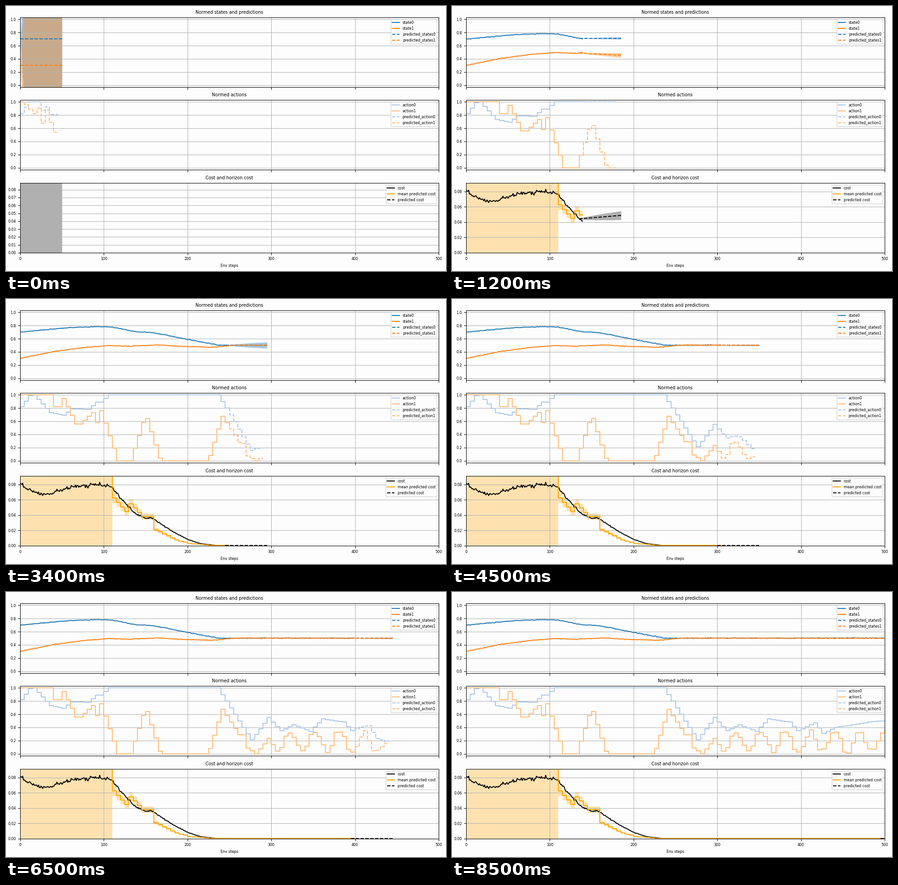
Recreate the animation shown at these times as a matplotlib script. Size 964 by 581 pixels, loop 8.6 s.

```python
import numpy as np
import matplotlib.pyplot as plt
from matplotlib.animation import FuncAnimation
from matplotlib.ticker import MultipleLocator

W, H, DPI = 964, 581, 96
FRAMES, INTERVAL = 86, 100
BLOCK, HORIZON, LEARNED, SETTLED = 5, 50, 110, 240
PAPER = "#fdfdfd"
STATE_COLORS = ("#1f77b4", "#ff7f0e")
ACTION_COLORS = ("#aec7e8", "#ffbb78")

plt.rcParams.update({"font.family": "DejaVu Sans", "font.size": 6,
                     "axes.facecolor": PAPER})
rng = np.random.RandomState(4)
steps = np.arange(561)
blocks = np.arange(0, 561, BLOCK)
ramp = np.linspace(0, 1, HORIZON + 1)


def curve(points, smooth):
    """Smoothed line through a few (x, y) points, one value per step."""
    y = np.pad(np.interp(steps, *zip(*points)), smooth // 2, mode="edge")
    return np.convolve(y, np.ones(smooth) / smooth, mode="valid")


def fade(s, start, span):
    return np.exp(-max(s - start, 0) / span)


# Smooth trends and their noisy observations
trend = [
    curve([(0, .70), (55, .765), (90, .784), (110, .777), (137, .708), (160, .69),
           (200, .59), (237, .501), (500, .504)], 9),
    curve([(0, .30), (40, .405), (75, .465), (105, .495), (130, .487), (167, .505),
           (185, .488), (232, .47), (255, .503), (500, .50)], 9),
]
states = [t + rng.normal(0, .0028, t.size) for t in trend]

cost_trend = curve([(0, .083), (5, .075), (28, .067), (35, .068), (60, .0765),
                    (90, .080), (108, .078), (136, .043), (148, .037), (158, .036),
                    (180, .020), (200, .0083), (216, .0026), (235, .0004), (500, .0002)], 5)
cost = cost_trend * (1 + rng.normal(0, .015, steps.size))

# Actions hold one value per block; once settled they wander around a set point
act0 = np.interp(blocks, *zip(
    (0, .82), (10, .99), (15, 1), (35, .73), (50, .69), (60, .79), (80, .78), (90, .89),
    (95, .89), (105, 1), (235, 1), (270, .3), (275, .21), (295, .55), (310, .35),
    (325, .44), (345, .34), (360, .53), (385, .48), (395, .35), (415, .47), (425, .31),
    (440, .40), (490, .50)))
act1 = np.interp(blocks, *zip(
    (35, 1), (40, .82), (45, .82), (50, .95), (65, .56), (70, .56), (85, .73), (90, .58),
    (95, .76), (115, 0), (130, 0), (145, .58), (150, .64), (165, .04), (170, 0), (220, 0),
    (225, .08), (240, .68), (260, .29), (265, .29), (270, .09), (280, 0), (295, .23)))
wave = .19 - .15 * np.cos(2 * np.pi * (blocks - 335) / 29.5)
wave += rng.normal(0, .03, wave.size)
act1 = np.where(blocks < 300, act1, wave).clip(0, 1)
actions = [act0, act1]

# Cost expected by the model: useless before LEARNED, then one value per block
mean_cost = np.interp(steps // BLOCK * BLOCK, *zip(
    (110, .0625), (125, .045), (130, .055), (145, .038), (155, .038), (160, .021),
    (185, .0075), (200, .003), (230, .0004)))
mean_cost[:LEARNED] = .5
mean_std = np.where(steps < LEARNED, .6, .11 * mean_cost)


def start_step(k):
    """Environment step at which the plan of this frame begins."""
    if k < 6:
        return BLOCK * int(round(21 * (1 - (1 - k / 6) ** 1.5)))
    return 75 + BLOCK * (k - (k > 64))


def plan(s, i):
    """Coming actions: jittery at first, easing off once settled."""
    b = s // BLOCK + (s > 0)
    p = actions[i][b:b + 8 + (s == 0)].copy()
    r = np.linspace(0, 1, p.size)
    if s > SETTLED:
        p *= 1 - .5 * r ** 2
    elif s < LEARNED:
        noise = np.random.RandomState(s + i).normal(0, .06, p.size)
        p += (1 - s / LEARNED) * ((.1, -.3)[i] * r + noise * (r > .15))
    return np.append(p, p[-1]).clip(0, 1)


def predict_state(s, i):
    drift = -.035 * i * min(s / 135, 1)
    hold = fade(s, 135, 24)
    mean = (1 - hold) * trend[i][s:s + HORIZON + 1] + hold * (trend[i][s] + drift * ramp)
    if s < LEARNED:
        return mean, .8 * np.minimum(ramp * 12, 1)
    bump = .036 * np.exp(-((s - 245) / 15) ** 2) * (1 - i)
    return mean, (.011 + (.006 + .016 * i) * fade(s, 135, 40) + bump) * ramp ** .7


def predict_cost(s):
    if s < LEARNED:
        return .5 + 0 * ramp, .8 + 0 * ramp
    hold = fade(s, 135, 16)
    mean = (1 - hold) * cost_trend[s:s + HORIZON + 1] + hold * (cost_trend[s] + .0045 * ramp)
    return mean, (.0038 * hold + .002 * fade(s, 180, 15)) * ramp ** .6


fig = plt.figure(figsize=(W / DPI, H / DPI), dpi=DPI, facecolor=PAPER)


def panel(top, title, labels=False):
    ax = fig.add_axes([31 / W, 1 - (top + 153) / H, 917 / W, 153 / H])
    ax.set_title(title)
    ax.set_xlim(0, 500)
    ax.set_ylim(-.03, 1.03)
    ax.xaxis.set_major_locator(MultipleLocator(100))
    ax.yaxis.set_major_locator(MultipleLocator(.2))
    ax.tick_params(labelbottom=labels)
    ax.grid(True)
    return ax


def line(ax, label, color, **kw):
    return ax.plot([], [], label=label, color=color, **kw)[0]


def pair(ax, label, colors, **kw):
    return [line(ax, f"{label}{i}", c, **kw) for i, c in enumerate(colors)]


ax_s = panel(25, "Normed states and predictions")
ax_a = panel(206, "Normed actions")
ax_c = panel(388, "Cost and horizon cost", True)
ax_c.set_xlabel("Env steps")

state_lines = pair(ax_s, "state", STATE_COLORS)
state_preds = pair(ax_s, "predicted_states", STATE_COLORS, ls="--")
action_lines = pair(ax_a, "action", ACTION_COLORS, drawstyle="steps-post")
action_preds = pair(ax_a, "predicted_action", ACTION_COLORS, ls="--",
                    drawstyle="steps-post")
cost_line = line(ax_c, "cost", "black")
mean_line = line(ax_c, "mean predicted cost", "orange", drawstyle="steps-post")
cost_pred = line(ax_c, "predicted cost", "black", ls="--")
for ax in (ax_s, ax_a, ax_c):
    ax.legend(loc="upper right")

bands = []


def band(ax, x, mean, std, color, alpha, **kw):
    bands.append(ax.fill_between(x, mean - std, mean + std, color=color,
                                 alpha=alpha, lw=0, **kw))


def update(k):
    while bands:
        bands.pop().remove()
    s = start_step(k)
    n = s + BLOCK if s else 1
    ahead = np.arange(s, s + HORIZON + 1)

    for i in range(2):
        state_lines[i].set_data(steps[:n], states[i][:n])
        mean, std = predict_state(s, i)
        state_preds[i].set_data(ahead, mean)
        band(ax_s, ahead, mean, std, STATE_COLORS[i], .4)

        p = plan(s, i)
        b = s // BLOCK + 1 if s else 0
        done = actions[i][:b]
        action_lines[i].set_data(blocks[:b + 1] if b else [], np.append(done, done[-1:]))
        x = blocks[b:b + p.size]
        action_preds[i].set_data(np.append(x[:1], x), np.append(done[-1] if b else p[0], p))

    cost_line.set_data(steps[:n], cost[:n])
    mean_line.set_data(steps[:n], mean_cost[:n])
    if s:
        band(ax_c, steps[:n], mean_cost[:n], mean_std[:n], "orange", .3, step="post")
    mean, std = predict_cost(s)
    cost_pred.set_data(ahead, mean)
    band(ax_c, ahead, mean, std, "black", .3)

    ax_c.set_ylim(0, .0913 if s else .0885)
    ax_c.yaxis.set_major_locator(MultipleLocator(.02 if s else .01))
    return []


anim = FuncAnimation(fig, update, frames=FRAMES, interval=INTERVAL,
                     init_func=lambda: update(0), repeat=True, repeat_delay=0, blit=False)
plt.show()
```
